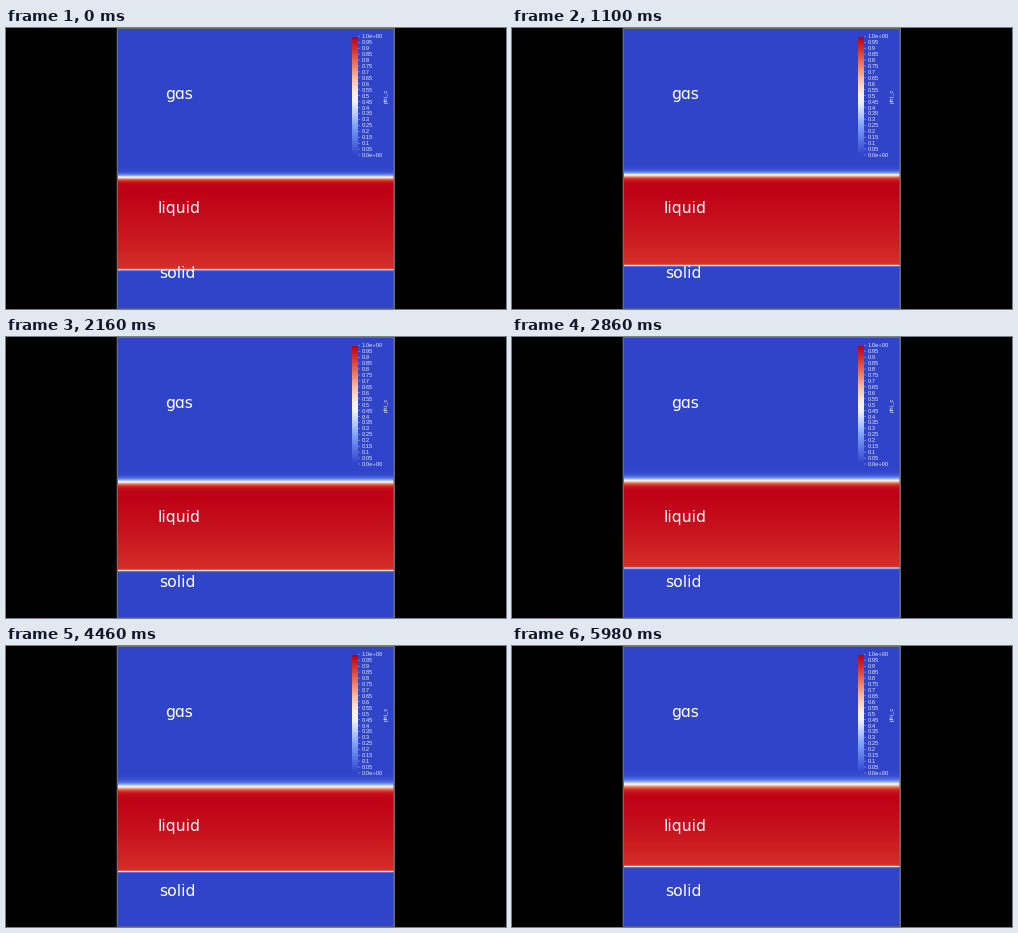
Animation of 500x281 px, one loop 6000 ms. Source, as a matplotlib script:

```python
import matplotlib.pyplot as plt
import numpy as np
from matplotlib.animation import FuncAnimation
from matplotlib.colors import LinearSegmentedColormap
from matplotlib.patches import Rectangle

W, H, DPI = 500, 281, 64
FRAMES, STEP = 300, 20
LEFT, RIGHT = 112, 388

STOPS = [
    (0.00, (48, 68, 202)),
    (0.25, (130, 165, 250)),
    (0.45, (240, 243, 250)),
    (0.52, (248, 240, 232)),
    (0.65, (250, 190, 160)),
    (0.80, (232, 105, 80)),
    (0.90, (214, 48, 42)),
    (1.00, (190, 0, 22)),
]
cmap = LinearSegmentedColormap.from_list(
    "phase", [(p, tuple(c / 255 for c in rgb)) for p, rgb in STOPS], N=512)

fig = plt.figure(figsize=(W / DPI, H / DPI), dpi=DPI, facecolor="black")
ax = fig.add_axes([0, 0, 1, 1])
ax.set_axis_off()


def label(x, y, s, px, font, color="white", **kw):
    return ax.text(x, y, s, color=color, fontsize=px * 72 / DPI,
                   family=font, zorder=5, **kw)


def box(x, y, w, h, color):
    ax.add_patch(Rectangle((x, y), w, h, color=color, lw=0, zorder=3, snap=False))


rows = np.arange(H) + 0.5


def phase(t):
    """Concentration of the liquid along the height at t seconds."""
    top = 149.2 - 2.1 * t + 0.04 * t**2
    bottom = 241.85 - 3.938 * t + 0.0657 * t**2
    soft = 3.3 + 0.25 * t
    depth = np.clip((rows - top) / (bottom - top), 0, 1)
    bulk = 1 - 0.1 * depth**1.5
    rise = 0.5 * (1 + np.tanh((rows - top) / soft))
    fall = 0.5 * (1 - np.tanh((rows - bottom) / 0.9))
    return (bulk * rise * fall)[:, None]


style = dict(cmap=cmap, vmin=0, vmax=1, aspect="auto", interpolation="nearest")
field = ax.imshow(phase(0), extent=(LEFT, RIGHT, H, 0), zorder=1, **style)

# Panel frame
GREY = "#6c6f68"
box(LEFT - 1.3, 0, 1.3, H, GREY)
box(RIGHT - 0.6, 0, 1.6, H, GREY)
box(LEFT - 1, 0, RIGHT - LEFT + 2, 1, GREY)
box(LEFT - 1, H - 0.6, RIGHT - LEFT + 2, 0.6, GREY)

# Colour scale
PALE = "#dfe4f8"
BAR_TOP, BAR_BOTTOM = 9, 127
ax.imshow(np.linspace(1, 0, BAR_BOTTOM - BAR_TOP)[:, None],
          extent=(346, 352, BAR_BOTTOM, BAR_TOP), zorder=2, **style)
for i in range(21):
    v = i / 20
    y = BAR_BOTTOM + (BAR_TOP - 0.7 - BAR_BOTTOM) * v
    s = f"{v:.2g}"
    if i in (0, 20):
        s = f"{v:.1f}e+00"
    box(352, y - 0.25, 2, 0.5, "#aab6ee")
    label(356, y + 2, s, 5.8, "Liberation Sans", PALE)
label(380, 68, "phi_c", 6, "Liberation Sans", PALE,
      rotation=90, ha="center", va="center")

# Region names; the script alpha gives a round single-storey "a"
for x, y, s in [(173, 71, "g\u0251s"), (173, 185, "liquid"), (171.5, 250.5, "solid")]:
    label(x, y, s, 15.7, "DejaVu Sans", ha="center", va="baseline")

ax.set_xlim(0, W)
ax.set_ylim(H, 0)


def update(i):
    field.set_data(phase(i * STEP / 1000))
    return (field,)


anim = FuncAnimation(fig, update, frames=FRAMES, interval=STEP,
                     repeat=True, repeat_delay=0, blit=False)
plt.show()
```
